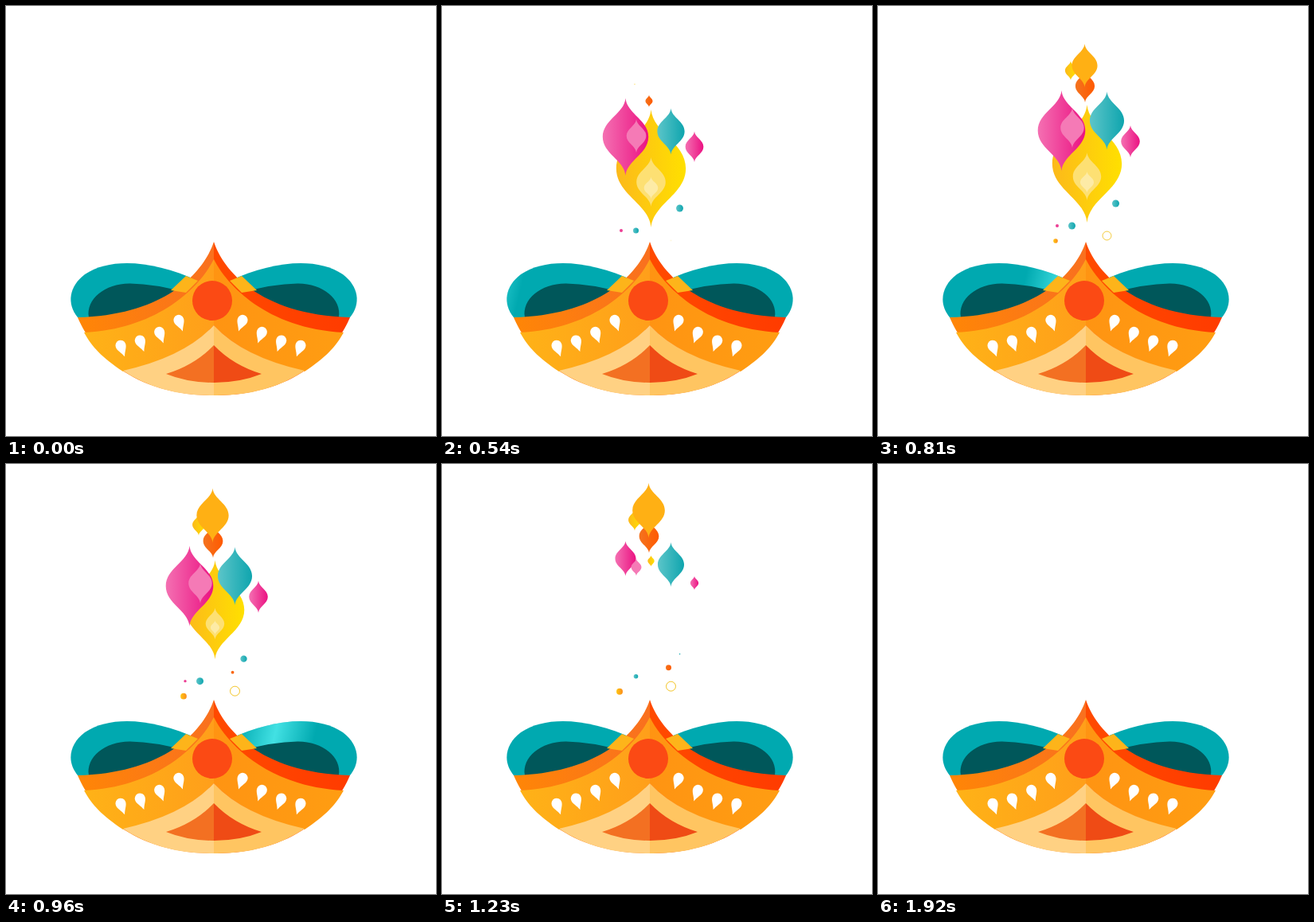
These frames come from a looping animation (540 by 540 pixels, 2850 ms). An HTML page:

```html
<!DOCTYPE html>
<html lang="en">
<head>
<meta charset="utf-8">
<title>Festival lamp</title>
<style>
html, body { margin: 0; width: 100%; height: 100%; overflow: hidden; background: #fff; }
svg { display: block; width: 100vw; height: 100vh; }
</style>
</head>
<body>
<svg id="stage" viewBox="0 0 540 540" xmlns="http://www.w3.org/2000/svg"></svg>
<script>
const LOOP = 2850, STEP = 30, FIRST = 60, LAST = 1920;
const DRIFT = 0.0222, REF = 540;         // upward speed, time at which heights are given
const GROW = 420, SHRINK = 500, LIFE = 760;
const ASPECT = 0.59;
const stage = document.getElementById('stage');

const gradients = {
  yellow: ['#fcb91b', '#ffe000'],
  pink: ['#f470b2', '#eb1282'],
  teal: ['#5cc5c9', '#0fa5ae'],
  ember: ['#f4731f', '#ff5a00'],
  amber: ['#ffc814', '#fb8c1c'],
  bodyL: ['#ffb217', '#ff9f1a'],
  bodyR: ['#ff9d12', '#ff9412'],
  stripeL: ['#ff8606', '#f9701f'],
  stripeR: ['#ff3b00', '#ff4a00']
};
const gradientDefs = Object.entries(gradients).map(([id, [a, b]]) =>
  `<linearGradient id="${id}"><stop stop-color="${a}"/><stop offset="1" stop-color="${b}"/></linearGradient>`).join('');

// Left half of the lamp; the right half is its mirror image about x = 261.
const LOBE = 'M90 391C76 374 79 352 99 337C132 315 186 320 241 345L215 372L130 400Z';
const HOLLOW = 'M104 391C100 368 125 348 156 348.500Q188 349 226 360L150 397Z';
const BODY = 'M261 296C250 330 205 388 90 391C104 425 150 489 261 489Z';
const OVERLAP = 'M226 339L241 345L226 360L207 357Z';
const MAIN = 'M261 318C245 350 195 405 98 410C108 428 120 441 147 459Q224 441 261 401Z';
const PALE = 'M147 458Q224 441 261 401V489Q195 490 147 458Z';
const GEM = 'M261 426Q237 451 201 462Q228 473 261 473Z';

const shape = (d, fill) => `<path d="${d}" fill="${fill}"/>`;
const mirror = markup => `<g transform="translate(522 0) scale(-1 1)">${markup}</g>`;
const both = markup => markup + mirror(markup);
const half = (stripe, main, pale, gem) =>
  shape(BODY, stripe) + shape(OVERLAP, '#fdb41a') + shape(MAIN, main) + shape(PALE, pale) + shape(GEM, gem);

const SEED = 'M0 12C2 6 6.500 2 6.500 -3A6.500 6.500 0 0 0 -6.500 -3C-6.500 2 -2 6 0 12Z';
const seedRow = (x, dir) => [0, 1, 2, 3].map(i =>
  `<path d="${SEED}" fill="#fff" transform="translate(${x + dir * 24.3 * i} ${429 - 4 * i - 2.2 * i * i}) rotate(${-20 * dir})"/>`).join('');

stage.innerHTML = `<defs>${gradientDefs}
  <linearGradient id="shine" gradientUnits="userSpaceOnUse" y1="345" y2="367">
    <stop stop-color="#6ff" stop-opacity="0"/>
    <stop offset=".5" stop-color="#6ff" stop-opacity=".65"/>
    <stop offset="1" stop-color="#6ff" stop-opacity="0"/></linearGradient>
  <clipPath id="lobes"><path d="${LOBE}"/><path d="${LOBE}" transform="translate(522 0) scale(-1 1)"/></clipPath></defs>
  ${both(shape(LOBE, '#00a9b0'))}
  <rect x="60" y="300" width="400" height="110" fill="url(#shine)" clip-path="url(#lobes)"/>
  ${both(shape(HOLLOW, '#00575a'))}
  ${half('url(#stripeL)', 'url(#bodyL)', '#ffd183', '#f37022')}
  ${mirror(half('url(#stripeR)', 'url(#bodyR)', '#ffc561', '#ef4b15'))}
  ${seedRow(145, 1)}${seedRow(369, -1)}
  <circle cx="259" cy="370" r="25" fill="#fb4a14"/>
  <g id="sparks"></g>`;

const progress = (t, from, span) => Math.min(1, Math.max(0, (t - from) / span));
const grow = (t, born) => 1 - (1 - progress(t, born, GROW)) ** 2;
const shrink = (t, fade) => (1 + Math.cos(Math.PI * progress(t, fade, SHRINK))) / 2;

const PETAL = 'M0 0C.03 .2 .5 .28 .5 .5C.5 .72 .03 .8 0 1C-.03 .8 -.5 .72 -.5 .5C-.5 .28 -.03 .2 0 0Z';
const DOT = '<circle r="1"/>';
const RING = '<circle r=".92" fill="#fff" stroke="#f2c21c" stroke-width=".15"/>';
const layer = document.getElementById('sparks');
const sparks = [];

function addSpark(fill, markup, place) {
  const el = document.createElementNS('http://www.w3.org/2000/svg', 'g');
  el.setAttribute('fill', fill);
  el.innerHTML = markup;
  layer.append(el);
  sparks.push({ el, place });
}

// A petal rises from its base while growing and retreats to its tip while shrinking.
function petal(fill, x, base, h, born, { life = LIFE, core = '' } = {}) {
  const inner = core && `<path d="${PETAL}" fill="${core}" transform="translate(0 .4) scale(.48 .44)"/>`;
  addSpark(fill, `<path d="${PETAL}"/>${inner}`, (t, rise) => {
    const up = grow(t, born), size = h * up * shrink(t, born + life);
    return { x, y: base - rise - h * up, sx: size * ASPECT, sy: size };
  });
}

function dot(fill, x, y, r, born, markup = DOT) {
  addSpark(fill, markup, (t, rise) => {
    const size = r * grow(t, born) * shrink(t, born + 700);
    return { x, y: y - rise, sx: size, sy: size };
  });
}

petal('url(#yellow)', 262.5, 278, 148, 70);
petal('#fde073', 262.5, 252, 62, 125, { life: 630, core: '#fdeba6' });
petal('url(#pink)', 230.5, 213, 101, 200);
petal('#f57ab6', 244, 184, 50, 290, { life: 670 });
petal('url(#pink)', 317, 196, 40, 200);
petal('url(#teal)', 287.5, 186.5, 73, 310);
petal('url(#yellow)', 242, 99, 27, 527);
petal('url(#ember)', 260, 127, 42, 455);
petal('#ffb014', 259.5, 108, 69, 583);

dot('url(#teal)', 298.5, 254, 4.5, 170);
dot('url(#teal)', 243.5, 282, 4.5, 317);
dot('#ec3f95', 225, 282, 2, 130);
dot('url(#amber)', 223, 301, 4, 620);
dot('url(#ember)', 284.5, 271, 3.5, 824);
dot('none', 287.5, 294.5, 6.5, 515, RING);

const shine = document.getElementById('shine');

function draw(t) {
  const rise = DRIFT * (t - REF);
  for (const { el, place } of sparks) {
    const { x, y, sx, sy } = place(t, rise);
    el.setAttribute('visibility', sy > 0.4 ? 'visible' : 'hidden');
    el.setAttribute('transform', `translate(${x} ${y}) scale(${sx} ${sy})`);
  }
  const glint = 232 + 0.68 * (t - 810);
  shine.setAttribute('x1', glint - 48);
  shine.setAttribute('x2', glint + 48);
}

const start = performance.now();
function tick() {
  const t = (performance.now() - start) % LOOP;
  draw(t < FIRST || t >= LAST ? 0 : Math.floor(t / STEP) * STEP);
  requestAnimationFrame(tick);
}
draw(0);
requestAnimationFrame(tick);
</script>
</body>
</html>
```
